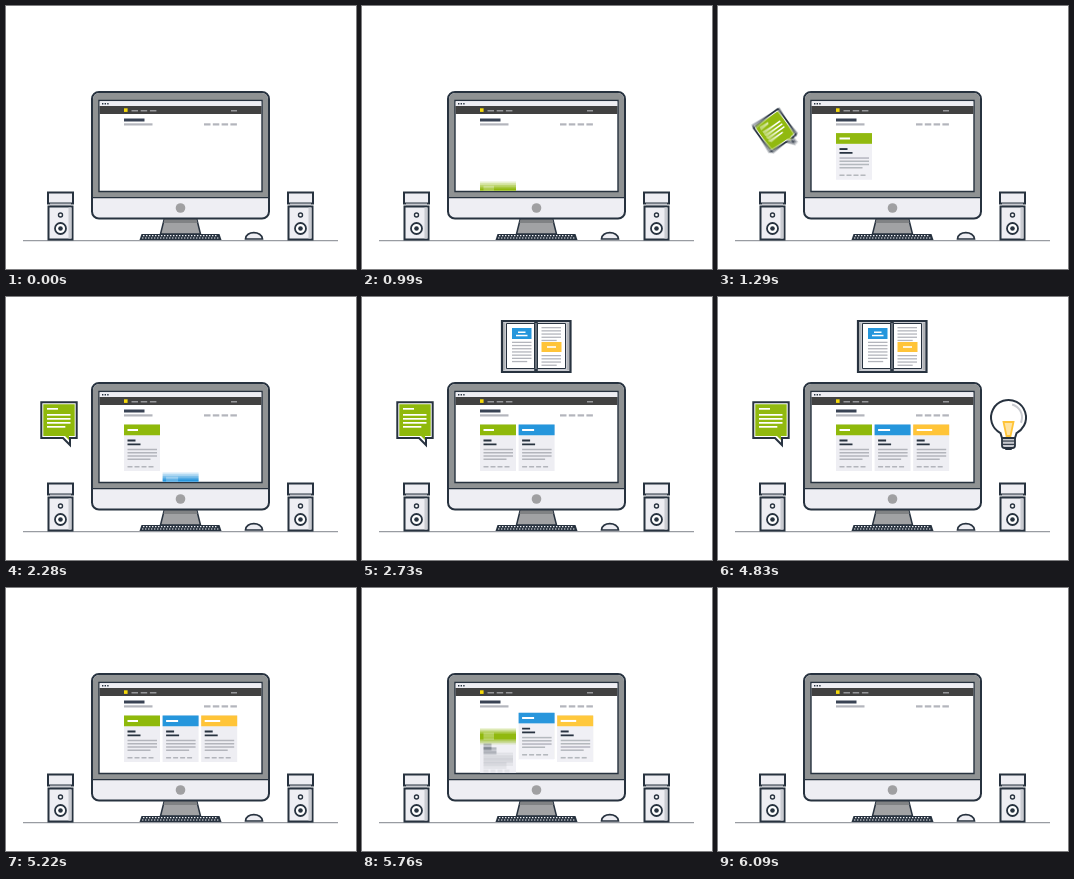
Write an HTML page with a canvas that moves like this. It is 350 by 263 pixels and loops after 6.3 s.

```html
<!DOCTYPE html>
<html lang="en">
<head>
<meta charset="utf-8">
<title>Desk</title>
<style>
html, body { margin: 0; width: 100%; height: 100%; overflow: hidden; background: #fff; }
canvas { display: block; width: 350px; height: 263px; }
</style>
</head>
<body>
<canvas id="stage"></canvas>
<script>
const W = 350, H = 263, LOOP = 6300, SHUTTER = 16, SAMPLES = 5;
const ENTER = 450, LEAVE = 330, DELAY = 70;
const INK = '#27323f', GREY = '#8f9293', PALE = '#eeeef3', SHADE = '#c9cbd1', TEXT = '#b3b5bc';
const GREEN = '#8fb90b', BLUE = '#2596dc', AMBER = '#ffc438';
const scale = Math.max(1, window.devicePixelRatio || 1);

function layer(canvas) {
  canvas.width = W * scale;
  canvas.height = H * scale;
  const c = canvas.getContext('2d');
  c.scale(scale, scale);
  return c;
}
const stage = layer(document.getElementById('stage'));
const scratch = layer(document.createElement('canvas'));
const mix = layer(document.createElement('canvas'));

const phase = (t, start, length) => Math.min(1, Math.max(0, (t - start) / length));
const inBack = (u, s) => u * u * ((s + 1) * u - s);

function paint(c, fill, stroke, line) {
  if (fill) { c.fillStyle = fill; c.fill(); }
  if (stroke) { c.strokeStyle = stroke; c.lineWidth = line; c.stroke(); }
}
function rect(c, x, y, w, h, fill, stroke, line = 2, radius = 0) {
  c.beginPath();
  c.roundRect(x, y, w, h, radius);
  paint(c, fill, stroke, line);
}
function disc(c, x, y, r, fill, stroke, line) {
  c.beginPath();
  c.arc(x, y, r, 0, 7);
  paint(c, fill, stroke, line);
}
// Symmetric four-sided shape that widens from top to bottom
function taper(c, x, top, bottom, half, spread, fill, stroke, line) {
  c.beginPath();
  c.moveTo(x - half, top);
  c.lineTo(x + half, top);
  c.lineTo(x + half + spread, bottom);
  c.lineTo(x - half - spread, bottom);
  c.closePath();
  paint(c, fill, stroke, line);
}
function row(c, x, y, n, step, w, h, fill) {
  for (let i = 0; i < n; i++) rect(c, x + i * step, y, w, h, fill);
}
// Lines of text; the last one is shorter
function text(c, x, y, n, gap, w, h, fill) {
  for (let i = 0; i < n; i++) rect(c, x, y + i * gap, i < n - 1 ? w : w * .78, h, fill);
}

function speaker(c, x) {
  rect(c, x, 186.5, 25, 11, PALE, INK);
  rect(c, x + 2, 197.5, 21, 3, SHADE);
  rect(c, x + .5, 200.5, 24, 33, PALE, INK);
  rect(c, x + 20.5, 201.5, 3, 31, SHADE);
  disc(c, x + 12.5, 209, 2, '#fff', INK, 1.4);
  disc(c, x + 12.5, 222.5, 5.5, '#fff', INK, 1.8);
  disc(c, x + 12.5, 222.5, 2.3, INK);
}

function desk(c) {
  rect(c, 17, 234, 315, 1.2, '#999ca2');
  speaker(c, 42);
  speaker(c, 282);
  taper(c, 174.5, 212, 228, 16, 4, '#a1a2a4', INK, 1.5);
  taper(c, 174.5, 213, 217, 16, 1, '#808284');
  taper(c, 174.5, 228, 234, 39, 2, INK);
  row(c, 137, 229, 25, 3, 1.4, 1.2, PALE);
  row(c, 136, 231.6, 26, 3, 1.4, .9, PALE);
  c.beginPath();
  c.moveTo(239.5, 233);
  c.bezierCurveTo(239.5, 224.5, 256, 224.5, 256.5, 233);
  c.closePath();
  paint(c, PALE, INK, 1.7);

  rect(c, 86, 86, 177, 126.5, PALE, INK, 2, 7);
  rect(c, 87, 87, 175, 104, GREY, null, 0, [6, 6, 0, 0]);
  rect(c, 87, 191, 175, 1.2, INK);
  disc(c, 174.5, 202, 4.8, '#a0a0a2');
  rect(c, 93, 94.5, 163, 91, '#fff', INK, 1.4);
  rect(c, 93.7, 95.2, 161.6, 4.8, PALE);
  row(c, 96, 97, 3, 2.6, 1.4, 1.4, INK);
  rect(c, 93.7, 100, 161.6, 8, '#414141');
  rect(c, 118, 102.3, 3.6, 3.6, '#f5d90a');
  row(c, 125.5, 104, 3, 9.2, 6.5, 1.5, '#96979a');
  rect(c, 225, 104, 6, 1.5, '#96979a');
  rect(c, 118, 112.5, 20.5, 3, '#394354');
  rect(c, 118, 117.3, 28.5, 2.2, TEXT);
  row(c, 198, 117.3, 4, 8.8, 6.5, 2.2, TEXT);
}

function card(c, color, label) {
  rect(c, 0, 0, 36, 46.5, PALE);
  rect(c, 0, 0, 36, 10.7, color);
  rect(c, 3.5, 4.3, label, 2, '#fff');
  rect(c, 3.5, 15, 8, 1.8, INK);
  rect(c, 3.5, 18.8, 13, 1.8, INK);
  text(c, 3.5, 24.2, 4, 3.2, 29.5, 1.5, TEXT);
  row(c, 3.5, 41.3, 4, 7, 5, 1.6, TEXT);
}

// Icons are drawn around their own centre.
function bubble(c, inset, tip, fill, stroke) {
  const side = 17.7 - inset, top = -21.8 + inset, base = 14 - inset;
  c.beginPath();
  [[-side, top], [side, top], [side, base], [11 - inset / 2, base], [11 - inset / 2, tip],
    [4 + inset, base], [-side, base]].forEach(p => c.lineTo(...p));
  c.closePath();
  paint(c, fill, stroke, 2);
}
function note(c) {
  bubble(c, 0, 21, '#fff', INK);
  bubble(c, 2, 16, GREEN);
  rect(c, -12, -16, 11, 1.7, '#fff');
  text(c, -12, -10, 4, 4, 23.5, 1.7, '#fff');
}

function book(c) {
  rect(c, -34, -26, 68.5, 51, SHADE, INK, 2.2);
  for (const side of [-1, 1]) {
    rect(c, side * 15.5 - 14, -23.5, 28, 45, '#fff', INK, 1);
    rect(c, side * 32 - .4, -24, .8, 47, GREY);
  }
  rect(c, -1.8, -26, 3.6, 51, INK);
  rect(c, -.4, -24, .8, 46, SHADE);
  rect(c, -24, -19, 19.5, 11, BLUE);
  rect(c, -18, -15.5, 7.5, 1.5, '#fff');
  rect(c, -20, -12.2, 11.5, 1.5, '#fff');
  text(c, -24, -5.3, 7, 3.2, 19.5, 1.3, TEXT);
  text(c, 5.5, -20, 5, 3.2, 19.5, 1.3, TEXT);
  rect(c, 5.5, -5, 20, 10, AMBER);
  rect(c, 11, -.8, 9, 1.6, '#fff');
  text(c, 5.5, 8, 4, 3.2, 19.5, 1.3, TEXT);
}

function bulb(c) {
  rect(c, -3.5, 22, 7, 3, INK, null, 0, 1);
  rect(c, -6.5, 10, 13, 13, SHADE, INK, 1.8, 2.5);
  c.beginPath();
  c.arc(0, -7.5, 17.5, 2.05, 1.09);
  c.lineTo(6.5, 13);
  c.lineTo(-6.5, 13);
  c.closePath();
  paint(c, '#fff', INK, 2);
  c.beginPath();
  c.arc(0, -7.5, 13.5, -1.3, .4);
  paint(c, null, SHADE, 2);
  taper(c, 0, -3, 11, 5, -3, '#ffe3a0', AMBER, 1.8);
  for (const y of [15.5, 18.8]) rect(c, -6, y, 12, 1.1, INK);
}

const parts = [
  { icon: note, x: 53, y: 127, dx: 58, dy: 4, spin: -6.3, pulse: 0, color: GREEN, label: 10.5, start: 960 },
  { icon: book, x: 174, y: 50, dx: 0, dy: 60, spin: 0, pulse: 0, color: BLUE, label: 12, start: 2250 },
  { icon: bulb, x: 290.5, y: 128, dx: -45, dy: -32, spin: 6.3, pulse: .1, color: AMBER, label: 15.5, start: 3510 }
];
parts.forEach((p, i) => {
  p.cardX = 118 + 38.6 * i;
  p.hide = 4830 + 30 * i;
  p.drop = 5520 + 120 * i;
});

function drawIcon(c, p, t) {
  const away = (1 - phase(t, p.start + DELAY, ENTER - DELAY)) ** 2 + inBack(phase(t, p.hide, LEAVE), 1.1);
  if (away >= 1) return;
  const turn = Math.max(0, away);
  const beat = Math.sin(3 * Math.PI * phase(t, p.start + ENTER, 870)) ** 2;
  const size = 1 - .6 * turn ** .7 + p.pulse * beat;
  c.save();
  c.translate(p.x + p.dx * away, p.y + p.dy * away);
  c.rotate(p.spin * turn);
  c.scale(size, size);
  p.icon(c);
  c.restore();
}

function drawCard(c, p, t) {
  const fall = inBack(1 - phase(t, p.start, ENTER), .5) + inBack(phase(t, p.drop, LEAVE), 1.1);
  if (fall >= 1) return;
  c.save();
  c.beginPath();
  c.rect(93.7, 108, 161.6, 76.8);
  c.clip();
  c.translate(p.cardX, 127.6 + 66 * fall);
  card(c, p.color, p.label);
  c.restore();
}

// Averages several moments of a moving part.
function blurred(draw, p, t, leave) {
  const moving = [[p.start, ENTER], [leave, LEAVE]]
    .some(([from, length]) => t > from - SHUTTER && t < from + length + SHUTTER);
  if (!moving) return draw(stage, p, t);
  mix.clearRect(0, 0, W, H);
  mix.globalCompositeOperation = 'lighter';
  mix.globalAlpha = 1 / SAMPLES;
  for (let i = 0; i < SAMPLES; i++) {
    scratch.clearRect(0, 0, W, H);
    draw(scratch, p, t + SHUTTER * (i / (SAMPLES - 1) - .5));
    mix.drawImage(scratch.canvas, 0, 0, W, H);
  }
  stage.drawImage(mix.canvas, 0, 0, W, H);
}

function frame() {
  const t = performance.now() % LOOP;
  stage.fillStyle = '#fff';
  stage.fillRect(0, 0, W, H);
  parts.forEach(p => blurred(drawIcon, p, t, p.hide));
  desk(stage);
  parts.forEach(p => blurred(drawCard, p, t, p.drop));
  requestAnimationFrame(frame);
}
frame();
</script>
</body>
</html>
```
